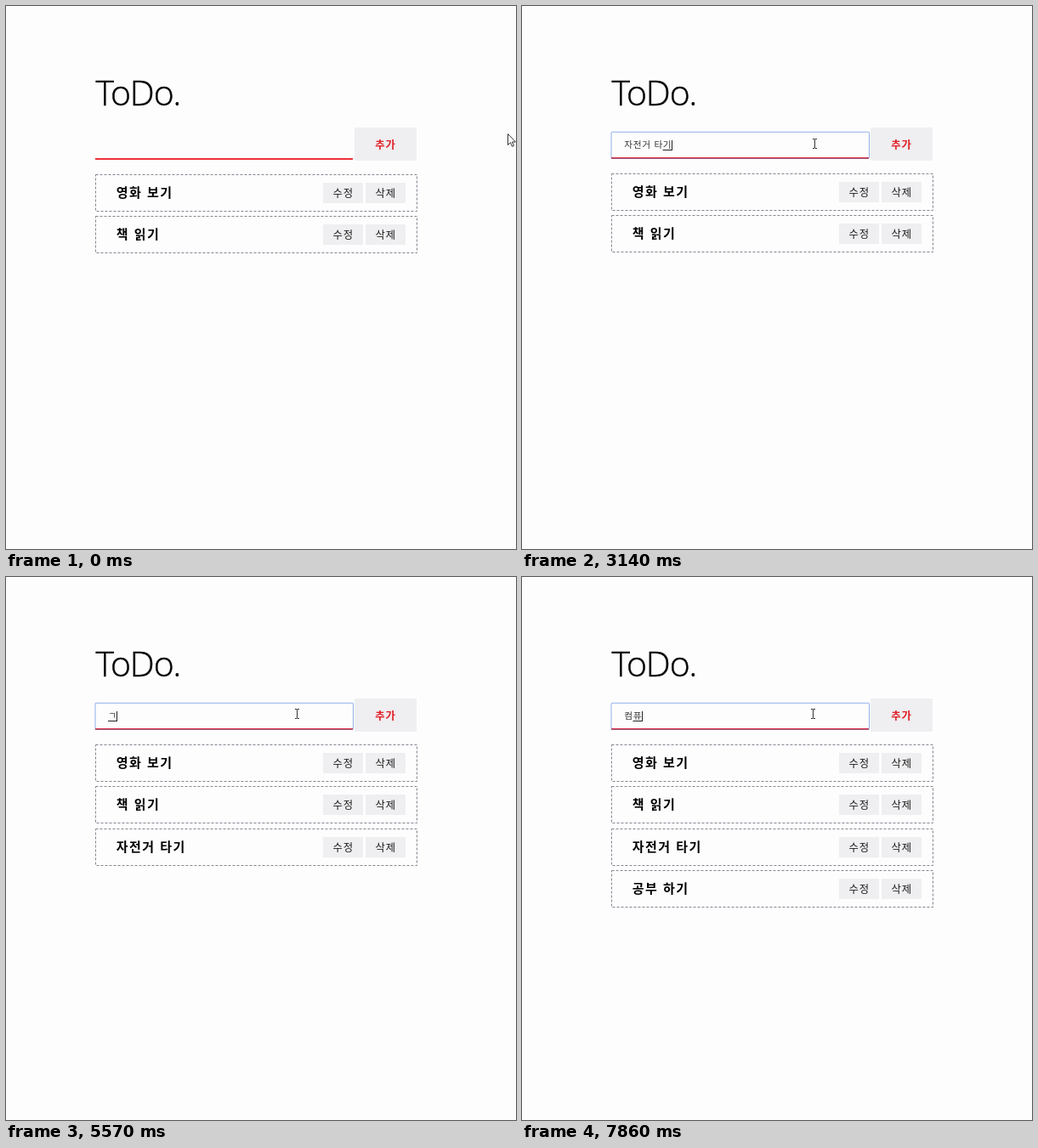
An HTML page that plays this animation: 600 px wide and 639 px high, repeating every 8 s.

```html
<!DOCTYPE html>
<html lang="ko">
<head>
<meta charset="utf-8">
<title>ToDo</title>
<style>
  html, body { margin: 0; width: 100%; height: 100%; overflow: hidden; background: #fefdfe; }
  svg { display: block; width: 600px; height: 639px; }
  text { font-family: "Noto Sans CJK KR", "Noto Sans CJK", sans-serif; fill: #1c1c1c; white-space: pre; }
  .title { font: 300 41px "Open Sans", sans-serif; letter-spacing: -1.1px; fill: #000; stroke: #000; stroke-width: .4px; }
  .item { font-size: 15px; font-weight: 700; letter-spacing: 1.5px; fill: #000; }
  .label { font-size: 12.4px; letter-spacing: .85px; text-anchor: middle; }
  .add { font-weight: 700; fill: #e01f26; }
  .typed { font-size: 10.7px; letter-spacing: .65px; fill: #333; }
  .key { fill: #efeef0; }
  .dash { fill: none; stroke: #88838e; stroke-dasharray: 3 2; }
  .line { fill: #ee3036; }
  .ring { fill: none; stroke: rgba(70, 125, 215, .6); }
  .ink { fill: #222; }
  .arrow { fill: #fff; stroke: #333; }
  .beam { fill: none; stroke: #333; }
</style>
</head>
<body>
<svg viewBox="0 0 600 639">
  <text class="title" x="105.4" y="117">ToDo.</text>
  <rect class="key" x="410" y="143" width="73" height="39"/>
  <text class="label add" x="446.4" y="167.6">추가</text>
  <g id="field">
    <rect class="line" x="105" y="178" width="303" height="2"/>
    <rect id="ring" class="ring" x="105" y="148.3" width="303.5" height="31" rx="1"/>
  </g>
  <text id="typed" class="typed" x="120.3" y="167.3"></text>
  <rect id="under" class="ink" y="169" height="1"/>
  <rect id="caret" class="ink" y="158" width="1" height="12"/>
  <g id="list"></g>
  <path id="arrow" class="arrow" d="M.5 .5v13l3-2.8 2 4.6 2-.9-2-4.4h4z"/>
  <path id="beam" class="beam" d="M-2.5-5.5h2l.5 .5 .5-.5h2M0-5v10M-2.5 5.5h2l.5-.5 .5 .5h2"/>
</svg>
<script>
const LOOP = 8000, FPS = 7, FOCUS = 8, GLYPH = 10.5;
const $ = id => document.getElementById(id);
const items = ['영화 보기', '책 읽기', '자전거 타기', '공부 하기'];

// Tick -> field content; a trailing "_" marks a syllable still being composed.
const typing = [
  [0, ''],
  [11, 'ㅈ_'], [12, '자_'], [13, '자ㅈ_'], [14, '자저_'], [15, '자전_'], [16, '자전ㄱ_'], [17, '자전거_'],
  [20, '자전거 '], [21, '자전거 타_'], [22, '자전거 타기_'], [24, ''],
  [25, 'ㅇ_'], [26, '여_'], [27, '영_'], [28, '영화_'], [29, '영화 ㅂ_'], [30, '영화 보_'],
  [33, '영화 ㅂ_'], [34, '영화 '], [35, '영화'], [36, '영'], [37, ''],
  [39, 'ㄱ_'], [40, '고_'], [41, '공_'], [42, '공ㅂ_'], [43, '공부_'], [44, '공부 하_'], [45, '공부 하기_'], [46, ''],
  [52, '커_'], [53, '컴_'], [54, '컴ㅍ_'], [55, '컴퓨_']
];

const button = (x, label) =>
  `<rect class="key" x="${x}" y="10" width="47" height="24"/>
   <text class="label" x="${x + 23.7}" y="26.7">${label}</text>`;

$('list').innerHTML = items.map(name =>
  `<g><rect class="dash" x="105.5" y=".5" width="378" height="43"/>
   <text class="item" x="129.7" y="26.8">${name}</text>
   ${button(373, '수정')}${button(423, '삭제')}</g>`).join('');
const rows = [...$('list').children];

const show = (el, on) => el.setAttribute('visibility', on ? 'visible' : 'hidden');
const move = (el, x, y) => el.setAttribute('transform', `translate(${x} ${y})`);

// Returns how far the page below sits lower while the field is empty.
function drawField(tick) {
  const raw = typing.findLast(([at]) => at <= tick)[1];
  const text = raw.replace('_', '');
  const drop = text ? 0 : 1;
  const focused = tick >= FOCUS;
  const blinkOff = tick === 50 || tick === 51;

  $('typed').textContent = text;
  const end = 120 + (text ? $('typed').getComputedTextLength() : 0);
  $('under').setAttribute('x', end - GLYPH);
  $('under').setAttribute('width', GLYPH);
  show($('under'), raw.endsWith('_'));
  $('caret').setAttribute('x', Math.round(end));
  show($('caret'), focused && !blinkOff);

  move($('field'), 0, drop);
  show($('ring'), focused);
  return drop;
}

function drawRows(tick, drop) {
  const count = tick < 24 ? 2 : tick < 46 ? 3 : 4;
  rows.forEach((row, i) => {
    move(row, 0, Math.round(197 + drop + 49.3 * i));
    show(row, i < count);
  });
}

function drawPointer(tick) {
  const p = Math.min(tick / 7, 1);
  const ease = p * p * (3 - 2 * p);
  let x = Math.round(590 - 246 * ease), y = Math.round(150 + 12 * ease);
  if (tick >= 33) { x = 342; y = 161; }
  const overField = x < 409;
  show($('arrow'), !overField);
  show($('beam'), overField);
  move($('arrow'), x, y);
  move($('beam'), x + .5, y);
}

function draw() {
  const t = performance.now() % LOOP;
  const tick = Math.floor(t * FPS / 1000 + .03);
  drawRows(tick, drawField(tick));
  drawPointer(tick);
  requestAnimationFrame(draw);
}
draw();
</script>
</body>
</html>
```
